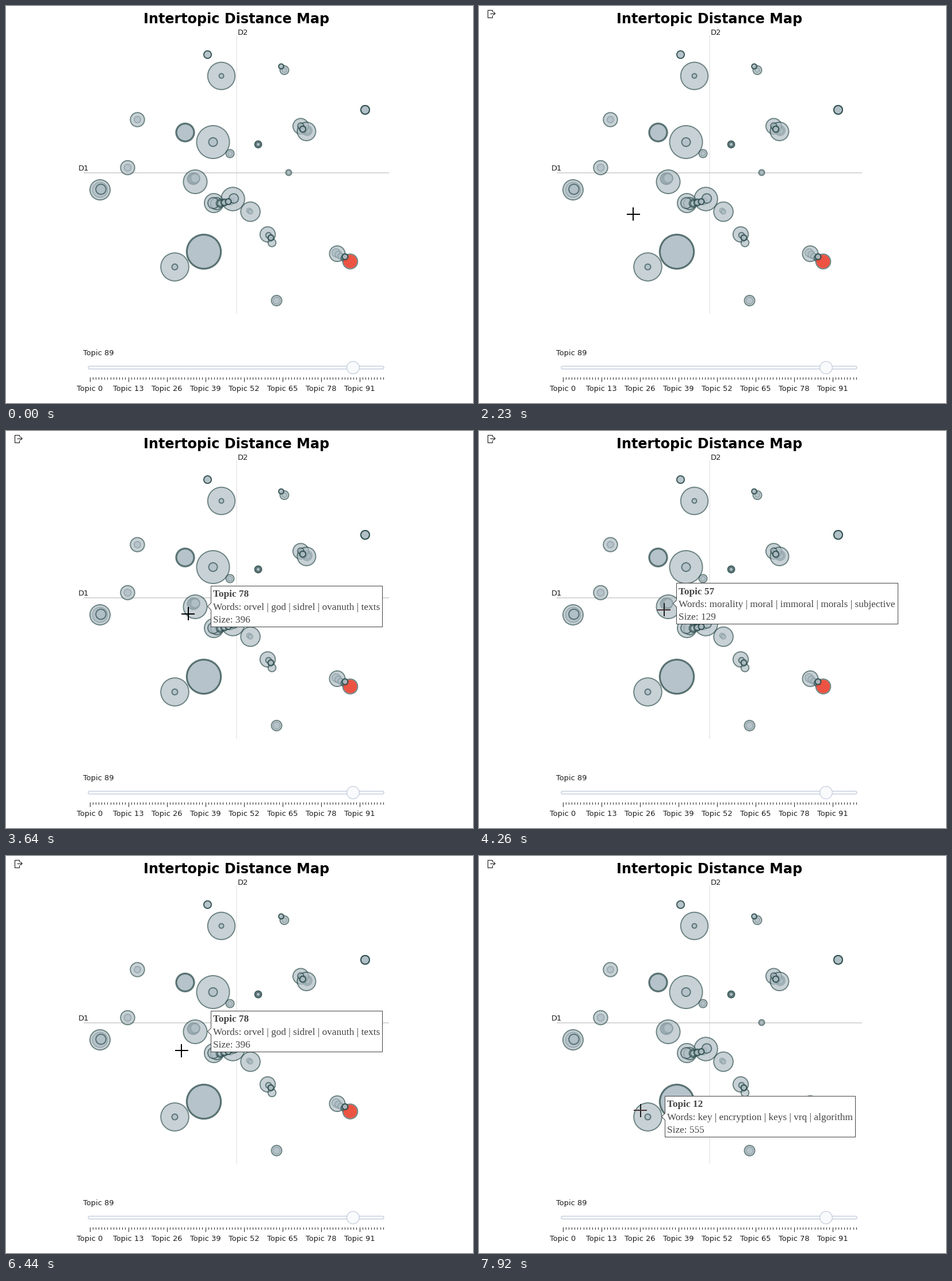
These frames come from a looping animation (812 by 690 pixels, 7990 ms). A matplotlib script:

```python
import numpy as np
import matplotlib.pyplot as plt
from matplotlib.animation import FuncAnimation
from matplotlib.collections import PatchCollection
from matplotlib.patches import Circle, FancyBboxPatch, Polygon

W, H, DPI = 812, 690, 64
PX = 72 / DPI  # points per pixel
FRAMES, INTERVAL = 235, 34

fig = plt.figure(figsize=(W / DPI, H / DPI), dpi=DPI, facecolor="white")
ax = fig.add_axes([0, 0, 1, 1])
ax.set_xlim(-0.5, W - 0.5)
ax.set_ylim(H - 0.5, -0.5)
ax.axis("off")


def label(x, y, s, size=13, color="#1c1c1c", family="DejaVu Sans", **kw):
    return ax.text(x, y, s, fontsize=size * PX, color=color, family=family,
                   va="baseline", **kw)


def stroke(xs, ys, color, width, z=1):
    return ax.plot(xs, ys, color=color, lw=width * PX, zorder=z,
                   solid_capstyle="butt", solid_joinstyle="miter")[0]


# Title and axes
label(400, 29.5, "Intertopic Distance Map", 23.9, "black", weight="bold", ha="center")
stroke([400, 400], [50, 534], "#ececec", 2)
stroke([134, 665], [289, 289], "#d7d7d7", 2)
label(125, 285, "D1")
label(402, 49.5, "D2")

# Topic bubbles
EDGE = 2
GREY, RED = (0.69, 0.745, 0.773, 0.7), (0.93, 0.29, 0.22, 0.95)
RING, NONE = (0.184, 0.31, 0.31, 0.7), (0, 0, 0, 0)
shapes, faces, edges, widths = [], [], [], []


def bubbles(x, y, *radii, fill=GREY):
    """Bubbles round one centre; a later, larger one veils those before it."""
    for r in radii:
        # fill and ring kept apart so that their transparency does not add up
        shapes.extend([Circle((x, y), r - EDGE / 2), Circle((x, y), r)])
        faces.extend([fill, NONE])
        edges.extend([NONE, RING])
        widths.extend([0, EDGE * PX])


# upper half
bubbles(350, 84, 6.5, 6.5)
bubbles(374, 121, 23.7, 4)
bubbles(483.5, 111, 4, 7.5)
bubbles(478, 104.5, 4.3, 4.3)
bubbles(624, 180, 7.5, 7.5, 7.5)
bubbles(228, 197, 5.5, 12.2)
bubbles(311, 219.3, 16.2, 14.8)
bubbles(359.5, 236, 28.5, 7.5)
bubbles(389, 256, 4, 7)
bubbles(438, 240, 6, 5.5, 3.5)
bubbles(523, 216, 8.5, 6)
bubbles(512, 208.5, 13.5)
bubbles(522, 217.5, 16)
bubbles(512, 208, 5.3)
bubbles(515.5, 213.5, 5.5, 5)

# middle
bubbles(211, 280.5, 6, 12.2)
bubbles(491, 289, 3, 5)
bubbles(163, 319, 13, 17.5)
bubbles(164.5, 318, 8.8)
for i in range(4):
    bubbles(324 + 1.5 * i, 300 - 0.4 * i, 10 - abs(i - 1))
bubbles(328.5, 305, 20.5)
bubbles(390, 339, 6)
bubbles(394, 335, 20.3)
bubbles(395.5, 334, 8.2)
bubbles(361, 342, 16.5)
bubbles(366, 343, 10.5)
bubbles(360, 342, 9.5)
for i in range(3):
    bubbles(372 + 7 * i, 342.5 - 1.5 * i, 7 - i, 5)
bubbles(422, 355, 4)
bubbles(424.5, 357, 4, 16.8)

# lower half
bubbles(454.5, 396.5, 13.2)
bubbles(462, 411, 6.8)
bubbles(456, 398, 4.8)
bubbles(460, 402.3, 5, 4.8)
bubbles(343.5, 426.5, 30.3, 29)
bubbles(293, 453, 24.3, 5)
bubbles(470, 511.5, 6, 9)
for i in range(3):
    bubbles(573.5 + 4 * i, 428.5 + 3 * i, 7 - i)
bubbles(575.5, 430, 13.5)
bubbles(587, 438, 5)
bubbles(598, 443.5, 12.8, fill=RED)
bubbles(589, 435.3, 5.2, 4.8)

ax.add_collection(PatchCollection(shapes, facecolors=faces, edgecolors=edges,
                                  linewidths=widths, zorder=2))

# Slider
STEP = 67 / 13
label(134, 606, "Topic 89")
ax.add_patch(FancyBboxPatch((142.5, 625.5), 514, 5, boxstyle="round,pad=0,rounding_size=2.5",
                            fc="#f8fafc", ec="#bec8d9", lw=1.2 * PX, zorder=2))
ax.add_patch(Circle((145 + 89 * STEP - 0.7, 628), 10.8, fc="#f8fafc", ec="#bec8d9",
                    lw=1.1 * PX, zorder=3))
for i in range(100):
    major = i % 13 == 0
    stroke([145 + i * STEP] * 2, [644.5, 652.5 if major else 648.5], "#333333", 1.1)
    if major:
        label(145 + i * STEP, 669, f"Topic {i}", ha="center")

# Exit icon, shown once the pointer is on the stage
icon = [
    stroke([22, 22, 14, 14, 22, 22], [9.5, 6, 6, 19, 19, 15.5], "#333333", 1.3, 5),
    stroke([18, 27], [12.5, 12.5], "#333333", 1.3, 5),
    stroke([24.5, 27.5, 24.5], [9.5, 12.5, 15.5], "#333333", 1.3, 5),
]


def tooltip(left, right, top, topic, words, size):
    mid, bottom = top + 35.5, top + 71
    outline = [(left, top), (right, top), (right, bottom), (left, bottom),
               (left, mid + 6), (left - 6, mid), (left, mid - 6)]
    parts = [ax.add_patch(Polygon(outline, fc="white", ec="#444444", lw=PX, zorder=6))]
    lines = [f"Topic {topic}", "Words: " + " | ".join(words.split()), f"Size: {size}"]
    for i, line in enumerate(lines):
        parts.append(label(left + 3.8, top + 19 + 22.4 * i, line, 17.2, "#444444",
                           "Liberation Serif", zorder=7,
                           weight="normal" if i else "bold"))
    return parts


TIPS = {
    78: tooltip(356, 654, 269, 78, "orvel god sidrel ovanuth texts", 396),
    57: tooltip(343, 728, 264, 57, "morality moral immoral morals subjective", 129),
    76: tooltip(341, 696, 264, 76, "atheists atheist atheism belief religion", 79),
    12: tooltip(323, 654, 417, 12, "key encryption keys vrq algorithm", 555),
}
TIP_TIMES = [(0, None), (2670, 78), (4260, 57), (5330, 76), (6350, 57),
             (6420, 78), (6500, None), (6810, 12)]

# Pointer path (ms, x, y), sampled at the times when the screen was refreshed
PATH = np.array([
    (1290, 20, 548), (2060, 238.5, 388), (2209, 268, 361), (2683, 301.5, 330),
    (2840, 309, 325), (3400, 309, 325), (3780, 320.5, 312.5), (4260, 321, 310),
    (5100, 323, 310.5), (5420, 322.5, 310), (5570, 323, 308), (6350, 317, 317),
    (6429, 304.5, 338), (6900, 276, 425), (7130, 280, 437.5), (7920, 280, 441.5),
])
REFRESH = 78
BURSTS = {1290: 11, 2130: 10, 2930: 1, 3480: 5, 4260: 1, 5100: 1, 5330: 2,
          5570: 1, 6350: 11, 7920: 1}
TICKS = np.concatenate([s + REFRESH * np.arange(k) for s, k in BURSTS.items()])
ARM = 11.5

bar_v = stroke([0, 0], [0, 0], "black", 2, 9)
bar_h = stroke([0, 0], [0, 0], "black", 2, 9)


def update(n):
    t = n * INTERVAL + INTERVAL - 1
    active = t >= TICKS[0]
    for part in icon + [bar_v, bar_h]:
        part.set_visible(active)

    now = TICKS[TICKS <= t][-1] if active else 0
    x, y = (np.interp(now, PATH[:, 0], PATH[:, k]) for k in (1, 2))
    bar_v.set_data([x, x], [y - ARM, y + ARM])
    bar_h.set_data([x - ARM, x + ARM], [y, y])
    over = 3700 <= now < 6350 or now > 7000
    bar_h.set_color("#4a3232" if over else "black")
    bar_v.set_color("#1f1f1f" if over else "black")

    shown = [key for start, key in TIP_TIMES if start <= now][-1]
    for key, parts in TIPS.items():
        for part in parts:
            part.set_visible(key == shown)
    return []


anim = FuncAnimation(fig, update, frames=FRAMES, interval=INTERVAL, repeat=True, blit=False)
plt.show()
```
